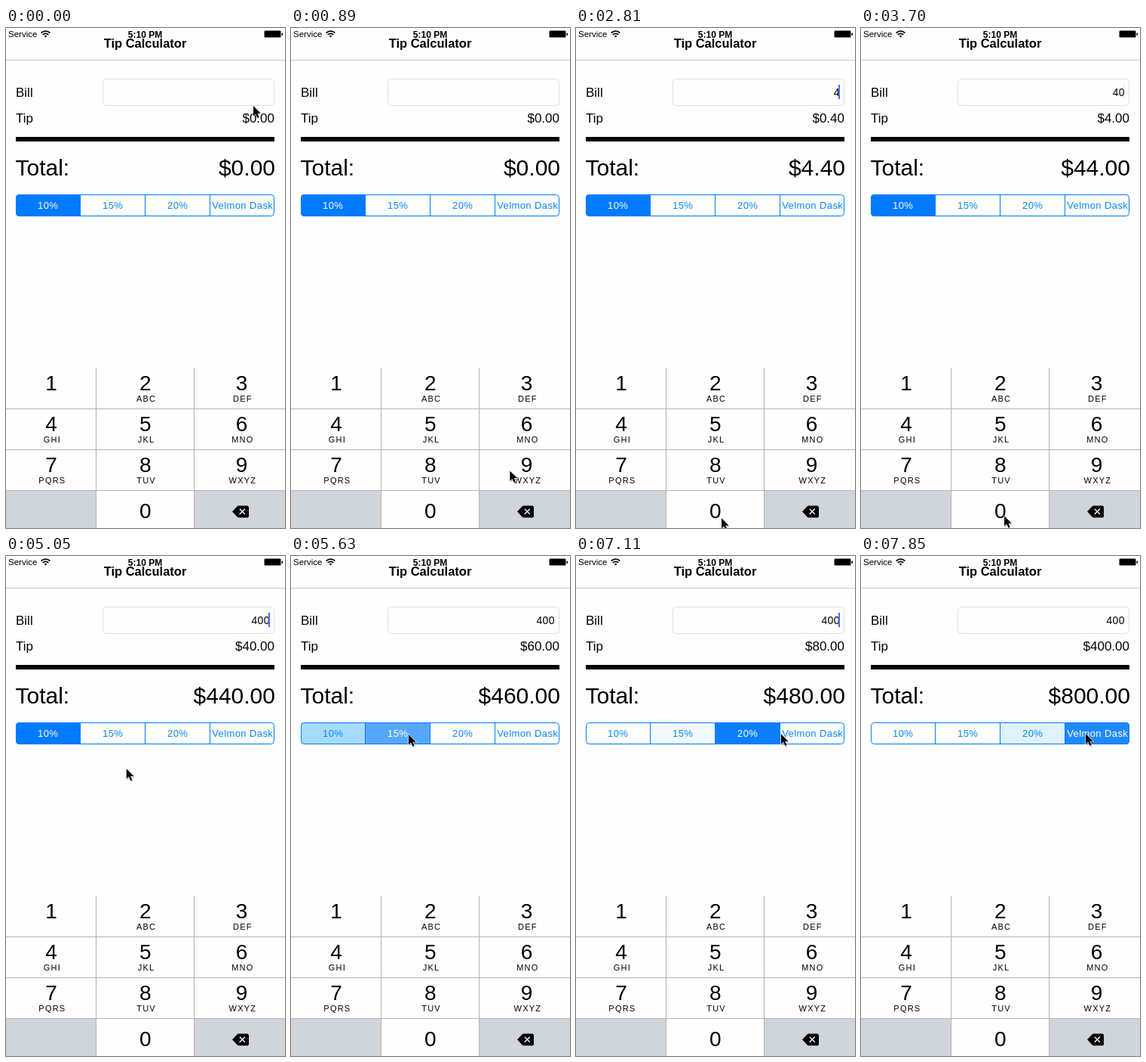
Animation, 370 px wide and 661 px high, one loop 8 s. Source, as an HTML page:

```html
<!DOCTYPE html>
<html lang="en">
<head>
<meta charset="utf-8">
<title>Tip Calculator</title>
<style>
  html, body { margin: 0; width: 100%; height: 100%; overflow: hidden; background: #fff; }
  svg { display: block; width: 370px; height: 661px; font-family: "Liberation Sans", Arial, sans-serif; }
  .end { text-anchor: end; }
  .mid { text-anchor: middle; }
  .body { font-size: 17px; }
  .big { font-size: 30px; }
  .bill { font-size: 14px; letter-spacing: .4px; }
  .digit { font-size: 28px; }
  .letters { font-size: 11px; letter-spacing: 1.2px; }
  .option { font-size: 13px; letter-spacing: .4px; }
</style>
</head>
<body>
<svg viewBox="0 0 370 661">
  <rect width="370" height="661" fill="#fefefe"/>

  <text x="3" y="12.2" font-size="11.5">Service</text>
  <g fill="none" stroke="#000" stroke-width="1.7">
    <path d="M46.6 6.6a8.3 8.3 0 0 1 11.8 0M48.7 8.9a5.4 5.4 0 0 1 7.6 0"/>
    <path d="M50.6 10.6a2.8 2.8 0 0 1 3.8 0L52.5 12.6Z" fill="#000" stroke="none"/>
  </g>
  <text class="mid" x="184.5" y="12.5" font-size="12" font-weight="700">5:10 PM</text>
  <rect x="342.5" y="3.5" width="22" height="9" rx="1.5" stroke="#888" stroke-width=".8"/>
  <rect x="365.5" y="6.5" width="1.5" height="3.5" rx=".7"/>
  <text class="mid" x="184.5" y="26" font-size="16.5" font-weight="700">Tip Calculator</text>
  <path d="M0 42.5H370" stroke="#c9c9c9"/>

  <text class="body" x="13" y="91">Bill</text>
  <rect x="128.5" y="67.5" width="227" height="35" rx="5" fill="#fefefe" stroke="#dedede"/>
  <text class="bill end" id="bill" x="350" y="90"></text>
  <rect id="caret" x="348" y="75" width="2" height="19" fill="#4373f0"/>
  <text class="body" x="13" y="125">Tip</text>
  <text class="body end" id="tip" x="356" y="125"></text>
  <rect x="13" y="144" width="343" height="6"/>
  <text class="big" x="12.5" y="194.5">Total:</text>
  <text class="big end" id="total" x="357" y="194.5"></text>

  <clipPath id="round"><rect x="13" y="220" width="343" height="29" rx="4.5"/></clipPath>
  <g id="fills" clip-path="url(#round)"></g>
  <path d="M98.5 220V249M184.5 220V249M270.5 220V249" stroke="#007aff"/>
  <rect x="13.5" y="220.5" width="342" height="28" rx="4" fill="none" stroke="#007aff"/>
  <g id="labels"></g>

  <g id="keys"></g>
  <path d="M119.5 449V661M249.5 449V661M0 503.5H370M0 557.5H370M0 611.5H370" stroke="#b2b4b8"/>
  <g id="keyText"></g>
  <path d="M300 639.3L306.5 632.4Q307.5 631.4 309 631.4H319.5Q322 631.4 322 634V644.7Q322 647.3 319.5 647.3H309Q307.5 647.3 306.5 646.3Z"/>
  <path d="M309.8 635.8l7 7m0-7l-7 7" stroke="#fff" stroke-width="1.3"/>

  <g id="pointer">
    <path d="M.8 1.8V15.3L3.9 12.5 6.3 17.3 8.3 16.3 6.3 11.5H10.3Z" opacity=".3"/>
    <path d="M0 0V13.4L3.1 10.5 5.4 15.7 7.6 14.7 5.4 9.7H9.7Z" stroke="#fff" stroke-width="1.1" paint-order="stroke"/>
  </g>
</svg>
<script>
const LOOP = 8000, TICK = 148.2, LEAD = 12;
const BLUE = "#007aff", SKY = "#0098ff", IDLE = "#fefefe", GRAY = "#d0d4db";
const byId = id => document.getElementById(id);
const clamp = v => Math.min(1, Math.max(0, v));
const money = v => "$" + v.toFixed(2);

const options = [["10%", .1], ["15%", .15], ["20%", .2], ["Velmon Dask", 1]];
options.forEach(([label], i) => {
  const x = 12.5 + 86 * i;
  byId("fills").innerHTML += `<rect x="${x}" y="220" width="86" height="29"/>`;
  byId("labels").innerHTML += `<text class="option mid" x="${x + 43.2}" y="239">${label}</text>`;
});

const columnEdges = [0, 119.5, 249.5, 375];
const keypad = ["1", "2ABC", "3DEF", "4GHI", "5JKL", "6MNO", "7PQRS", "8TUV", "9WXYZ", "", "0", ""];
keypad.forEach((key, i) => {
  const [left, right] = columnEdges.slice(i % 3);
  const center = (left + right) / 2, y = 449 + 54 * Math.floor(i / 3);
  byId("keys").innerHTML +=
    `<rect id="key${key[0]}" x="${left}" y="${y}" width="${right - left}" height="54" fill="${key ? IDLE : GRAY}"/>`;
  byId("keyText").innerHTML +=
    `<text class="digit mid" x="${center + .4}" y="${y + (i > 8 ? 36.5 : 29.5)}">${key.slice(0, 1)}</text>` +
    `<text class="letters mid" x="${center + 1.6}" y="${y + 45}">${key.slice(1)}</text>`;
});

// Times are in ticks; a tap counts when it is released.
const stops = [
  { x: 328, y: 103, arrive: 0, leave: 1 },
  { x: 290, y: 590, arrive: 7, leave: 8 },
  { x: 193, y: 568, arrive: 12, leave: 12 },
  { x: 66, y: 526, arrive: 15, leave: 17, tap: 17, digit: 4 },
  { x: 193, y: 648, arrive: 19, leave: 21, tap: 21, digit: 0 },
  { x: 190, y: 645, arrive: 24, leave: 30, tap: 27, digit: 0 },
  { x: 156, y: 236, arrive: 37, leave: 38, tap: 38, option: 1 },
  { x: 223, y: 236, arrive: 44, leave: 46, tap: 46, option: 2 },
  { x: 298, y: 235, arrive: 52, leave: 54, tap: 52, option: 3 }
];
const typing = stops.filter(s => "digit" in s);
const choices = [{ tap: -99, option: 0 }, ...stops.filter(s => s.option)];
const isPressed = (s, hold, tick) => tick >= s.tap - hold && tick < s.tap;

function pointerAt(tick) {
  const i = stops.findLastIndex(s => s.arrive <= tick);
  const from = stops[i], to = stops[i + 1] || from;
  const p = clamp((tick - from.leave) / (to.arrive - from.leave || 1));
  const eased = 1 - (1 - p) ** 2.6;
  return [from.x + (to.x - from.x) * eased, from.y + (to.y - from.y) * eased];
}

// Each typed digit restarts the one-second blink.
function caretAt(tick) {
  const last = typing.findLast(s => s.tap <= tick);
  const phase = (last ? (tick - last.tap) * TICK / 1000 : tick * TICK / 1000 + .84) % 1;
  return phase < .7 ? clamp((.607 - phase) / .125) : clamp((phase - .86) / .14);
}

// The chosen option fades in while the previous one fades out.
function optionLevel(i, tick) {
  const current = choices.findLastIndex(s => s.tap <= tick);
  const remaining = .35 ** (tick - choices[current].tap + 1);
  if (i === current) return 1 - remaining;
  if (i === current - 1) return remaining;
  return choices.some(s => s.option === i && isPressed(s, 2, tick)) ? .2 : 0;
}

function draw(tick) {
  const bill = typing.filter(s => s.tap <= tick).map(s => s.digit).join("");
  const tip = bill * options[choices.findLast(s => s.tap <= tick).option][1];
  byId("bill").textContent = bill;
  byId("tip").textContent = money(tip);
  byId("total").textContent = money(+bill + tip);
  byId("caret").setAttribute("opacity", caretAt(tick));

  options.forEach((_, i) => {
    const level = optionLevel(i, tick), fill = byId("fills").children[i];
    fill.setAttribute("opacity", level);
    fill.setAttribute("fill", level > .5 ? BLUE : SKY);
    byId("labels").children[i].setAttribute("fill", level > .5 ? "#fff" : "#0788f5");
  });

  const held = typing.find(s => isPressed(s, 1, tick));
  for (const { digit } of typing)
    byId("key" + digit).setAttribute("fill", held?.digit === digit ? GRAY : IDLE);
  byId("pointer").setAttribute("transform", `translate(${pointerAt(tick)})`);
}

const start = performance.now();
function frame() {
  const time = (performance.now() - start) % LOOP;
  draw(Math.floor((time + LEAD) / TICK));
  requestAnimationFrame(frame);
}
frame();
</script>
</body>
</html>
```
